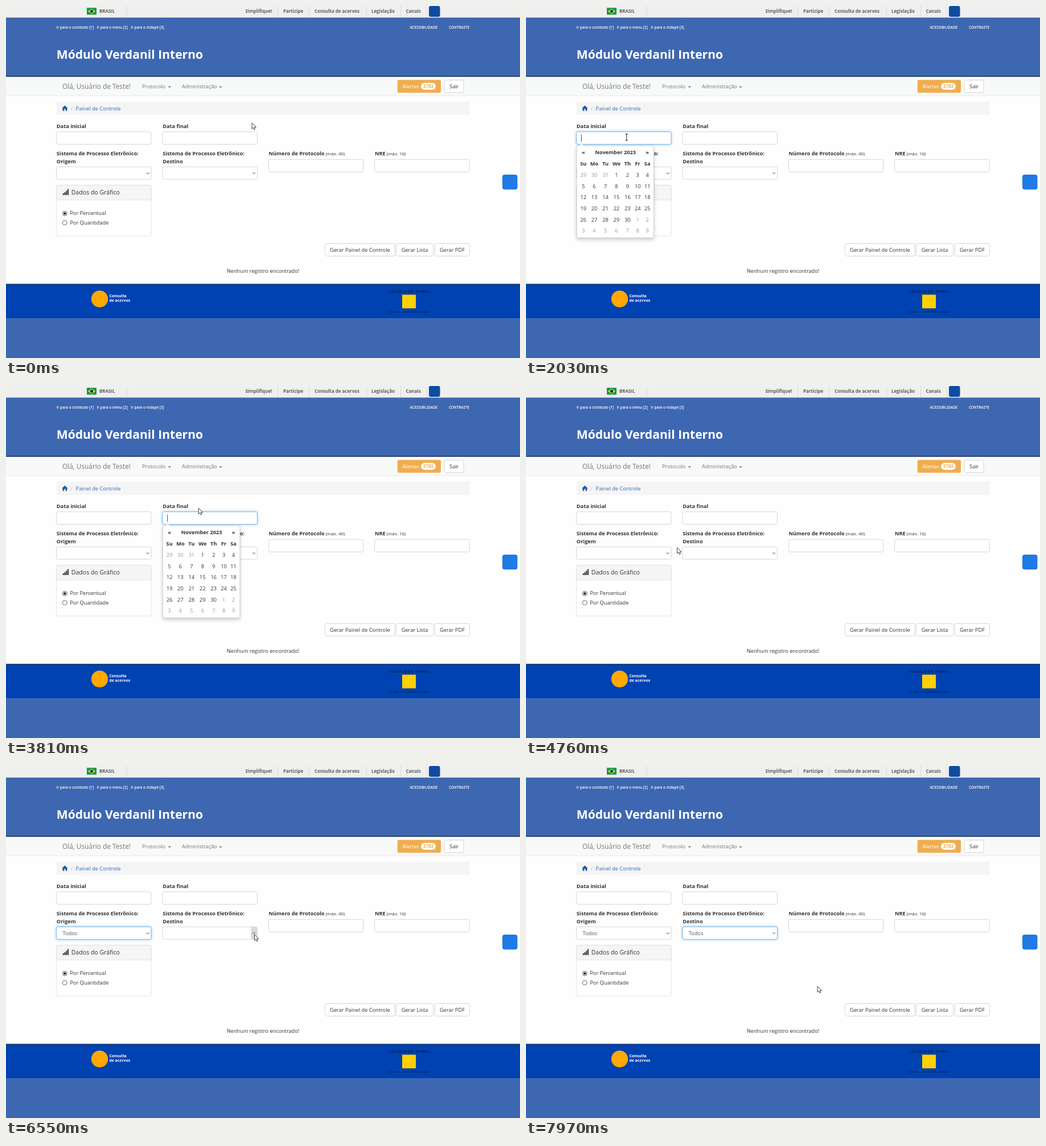
An HTML page that plays this animation: 903 px wide and 620 px high, repeating every 8000 ms.

```html
<!DOCTYPE html>
<html lang="pt-BR">
<head>
<meta charset="utf-8">
<title>Painel de Controle</title>
<style>
  html, body { margin: 0; width: 100%; height: 100%; overflow: hidden; background: #3e67b1; }
  svg { display: block; width: 903px; height: 620px; font-family: "Open Sans", sans-serif; }
  text { white-space: pre; }
  .focus { filter: drop-shadow(0 0 2.5px rgba(102, 175, 233, .7)); }
  .calendar { filter: drop-shadow(0 3px 3px rgba(0, 0, 0, .2)); }
  .list { filter: drop-shadow(0 0 1px rgba(0, 0, 0, .35)) drop-shadow(0 9px 11px rgba(0, 0, 0, .3)); }
</style>
</head>
<body>
<svg id="stage" viewBox="0 0 903 620"></svg>
<script>
const LOOP = 8000;
const INK = '#333', MUTED = '#777', BORDER = '#ccc', BLUE = '#3e67b1';
const COLUMN = 186.4, FIELD_W = 166.5, LEFT = 88.5;

const text = (x, y, label, { size = 9.22, fill = INK, weight = 400, anchor = 'start', spacing = 0 } = {}) =>
  `<text x="${x}" y="${y}" font-size="${size}" fill="${fill}" font-weight="${weight}"
    text-anchor="${anchor}" letter-spacing="${spacing}">${label}</text>`;
const centered = (x, y, label, style) => text(x, y, label, { anchor: 'middle', ...style });
const box = (x, y, w, h, fill, stroke = 'none', r = 0, extra = '') =>
  `<rect x="${x}" y="${y}" width="${w}" height="${h}" rx="${r}" fill="${fill}" stroke="${stroke}" stroke-width=".8" ${extra}/>`;
const path = (d, fill = 'none', stroke = 'none', width = 1) =>
  `<path d="${d}" fill="${fill}" stroke="${stroke}" stroke-width="${width}"/>`;
const circle = (x, y, r, fill, stroke = 'none') =>
  `<circle cx="${x}" cy="${y}" r="${r}" fill="${fill}" stroke="${stroke}" stroke-width=".9"/>`;
const show = (from, to, markup) => `<g data-from="${from}" data-to="${to}">${markup}</g>`;
const shift = (column, markup) => `<g transform="translate(${column * COLUMN})">${markup}</g>`;

const field = (column, y) => box(LEFT + column * COLUMN, y, FIELD_W, 22, '#fff', BORDER, 2.6);
const focus = y => box(LEFT, y, FIELD_W, 22, '#fff', '#66afe9', 2.6, 'class="focus"');
const button = (x, w, y, label) =>
  box(x, y, w, 22, '#fff', BORDER, 2.6) + centered(x + w / 2, y + 14.3, label);
const caretDown = x => path(`M${x} 141.6h5.4l-2.7 2.7z`, MUTED);

function topBar() {
  const links = [[420.5, 'Simplifique!'], [487, 'Participe'], [542, 'Consulta de acervos'],
    [642, 'Legislação'], [702.5, 'Canais']];
  const style = { size: 7.9, weight: 700, fill: '#606060' };
  return box(0, 0, 903, 21, '#efefef')
    + box(142, 3.2, 17, 12, '#0a9b3c')
    + path('M143.8 9.2l6.7-4.5 6.7 4.5-6.7 4.5z', '#fedf00') + circle(150.5, 9.2, 2.7, '#14317a')
    + text(164, 12, 'BRASIL', style)
    + [212, 477.5, 532.5, 633.5, 693.5, 739.5].map(x => box(x - .5, 0, 1, 20, '#dadada')).join('')
    + links.map(([x, label]) => text(x, 12, label, style)).join('')
    + box(743, 0, 19.5, 19, '#0f4ca3', 'none', 3);
}

function header() {
  const small = { size: 6.3, weight: 600, fill: '#fff' };
  return box(0, 20.4, 903, 104, BLUE) + box(0, 123, 903, 1.8, '#17305f')
    + text(88.8, 40, 'Ir para o conteúdo [1]', small)
    + text(159.5, 40, 'Ir para o menu [2]', small)
    + text(219.3, 40, 'Ir para o rodapé [3]', small)
    + text(709.5, 40, 'ACESSIBILIDADE', small) + text(778, 40, 'CONTRASTE', small)
    + text(88.8, 93, 'Módulo Verdanil Interno', { size: 21.1, weight: 700, fill: '#fff' })
    + box(0, 124.8, 903, 33.2, '#f8f9f9') + box(0, 157.6, 903, .8, '#e4e4e4')
    + text(99, 146, 'Olá, Usuário de Teste!', { size: 11.85, fill: MUTED })
    + text(239, 145, 'Protocolo', { fill: MUTED }) + caretDown(284.5)
    + text(309, 145, 'Administração', { fill: MUTED }) + caretDown(374.3)
    + box(687.8, 130.2, 76.2, 22.6, '#f0ad4e', 'none', 2.6)
    + text(696, 145, 'Alertas', { fill: '#fff' })
    + box(729, 135.5, 26, 12, '#fff', 'none', 6)
    + centered(742, 144.3, '2782', { size: 7.9, weight: 700, fill: '#f0ad4e' })
    + button(770.5, 33.5, 130.5, 'Sair')
    + box(89, 168.3, 725.3, 23.5, '#f5f5f5', 'none', 2.6)
    + path('M98 180.6l5.4-5.4 5.4 5.4h-1.5v4.2h-2.7v-3.2h-2.4v3.2h-2.7v-4.2z', '#2459a9')
    + text(113.6, 183.6, '/', { fill: '#bbb' })
    + text(122.6, 183.6, 'Painel de Controle', { fill: '#2d69b5' });
}

function form() {
  const bold = { weight: 700 }, note = { size: 7.85 };
  const system = (column, role) => shift(column,
    text(88.8, 263.4, 'Sistema de Processo Eletrônico:', { weight: 700, size: 9.18 }) + text(88.8, 276.5, role, bold));
  const bars = [3, 5, 7.5, 10.5].map((h, i) => box(99.8 + i * 2.7, 333 - h, 2, h, INK)).join('');
  return text(88.8, 215, 'Data inicial', bold) + text(275.2, 215, 'Data final', bold)
    + field(0, 221.6) + field(1, 221.6)
    + system(0, 'Origem') + system(1, 'Destino')
    + field(0, 283.3) + field(1, 283.3)
    + text(461.5, 263.4, 'Número de Protocolo', bold) + text(561.8, 263.4, '(máx. 40)', note)
    + text(648, 263.4, 'NRE', bold) + text(668.7, 263.4, '(máx. 16)', note)
    + field(2, 270.3) + field(3, 270.3)
    + box(LEFT, 315.5, FIELD_W, 89.5, '#fff', '#ddd', 2.6)
    + box(LEFT, 315.5, FIELD_W, 26.2, '#f5f5f5', '#ddd', 2.6)
    + bars + text(114.8, 332, 'Dados do Gráfico', { size: 10.55 })
    + circle(103.3, 365.4, 4, '#fff', '#444') + circle(103.3, 365.4, 2.2, '#222')
    + circle(103.3, 381.7, 4, '#fff', '#555')
    + text(112.3, 368.3, 'Por Percentual') + text(112.3, 384.7, 'Por Quantidade')
    + button(560.7, 122.5, 418.4, 'Gerar Painel de Controle')
    + button(685.3, 65.5, 418.4, 'Gerar Lista')
    + button(753.5, 61, 418.4, 'Gerar PDF')
    + text(387.8, 469.8, 'Nenhum registro encontrado!');
}

function footer() {
  const white = { size: 6.9, weight: 700, fill: '#fff' };
  return box(0, 489.7, 903, 61, '#0042b1') + box(0, 489.6, 903, 1.2, '#0a2454')
    + box(0, 550.4, 903, 70, BLUE)
    + circle(164.5, 516, 14.7, '#ffa800')
    + text(181.4, 512.5, 'Consulta', white) + text(181.4, 521, 'de acervos', white)
    + centered(708, 505.3, 'COLEGIADO NOVIL', { size: 6, weight: 700, fill: '#0b1838', spacing: 1 })
    + box(696, 508.5, 24, 24, '#ffd000')
    + centered(708, 540.5, 'RITMO E CONTINUIDADE', { size: 5, fill: '#0b1838', spacing: .7 })
    + box(872, 297, 26.5, 26.2, '#1f7ae6', 'none', 4);
}

function calendar() {
  const centers = [100.8, 120, 139.6, 159, 178.4, 196.2, 213.2];
  const bold = { weight: 700 };
  let cells = '';
  for (let i = 0; i < 42; i++) {
    const day = i - 2;
    const inMonth = day >= 1 && day <= 30;
    const label = day < 1 ? day + 31 : inMonth ? day : day - 30;
    cells += centered(centers[i % 7], 300.8 + Math.floor(i / 7) * 19.7, label, { fill: inMonth ? INK : '#999' });
  }
  return `<g class="calendar">${box(89, 246, 135.5, 162.3, '#fff', '#c8c8c8', 2.6)}</g>`
    + path('M93 246.5l4.5-4.6 4.5 4.6', '#fff', '#c8c8c8', .8)
    + centered(100.8, 261.4, '«', bold) + centered(157.2, 261.4, 'November 2023', bold) + centered(213.2, 261.4, '»', bold)
    + ['Su', 'Mo', 'Tu', 'We', 'Th', 'Fr', 'Sa'].map((d, i) => centered(centers[i], 281, d, bold)).join('')
    + cells;
}

const OPTIONS = ['', 'Todos', 'VOLQ-TUL', 'VUZ-TUL', 'VYX-PRELO', 'WUVQ-TUL', 'VQ-TUL', 'VURZ-TUL',
  'VOZUQE-PRELUNA', 'WEZORA-TUL', 'WQV-TUL', 'WYR-TUL', 'WZU-TUL', 'XOVUR-TUL', 'XUREVO-TUL',
  'XUREVO-TUL', 'Apagar', 'ZOVUK', 'ZOVUK2', 'ZQ-VUL'];

// picks: [from, to, highlighted row]
function list(picks) {
  const rowY = i => 304.7 + i * 13.12;
  const highlight = ([from, to, row]) => show(from, to,
    box(89, Math.max(rowY(row), 306), 221.3, row ? 13.12 : 12, '#1967d2')
    + text(99.5, rowY(row) + 9.8, OPTIONS[row], { fill: '#fff' }));
  return `<g class="list">${box(89, 305.8, 231.3, 262.6, '#fff', 'none', 3.5)}</g>`
    + box(310.3, 306.5, 9.5, 261, '#f7f7f7', 'none', 3)
    + box(310.3, 317, 9.7, 19.5, '#c1c1c1')
    + path('M313 312.2l2.2-2.2 2.2 2.2', 'none', '#999')
    + path('M313 562.3l2.2 2.2 2.2-2.2', 'none', '#444', 1.2)
    + OPTIONS.map((label, i) => text(99.5, rowY(i) + 9.8, label, { fill: '#555' })).join('')
    + picks.map(highlight).join('');
}

const textCaret = box(96.9, 226.5, .9, 12.5, '#333');
const arrowHover = box(243.8, 283.8, 10.8, 21, '#d9d9d9');
const chevron = path('M246.4 293.2l2.7 2.6 2.7-2.6', 'none', '#444', 1);
const chosen = text(99.5, 297.8, 'Todos', { fill: '#555' });

const fields =
  show(1830, 3450, focus(221.6)) + show(1830, 2430, textCaret)
  + show(5040, 6820, focus(283.3)) + show(4940, 5920, arrowHover) + show(5920, LOOP, chosen) + chevron
  + shift(1, show(6820, LOOP, focus(283.3)) + show(6480, 7690, arrowHover) + show(7690, LOOP, chosen) + chevron);

const popups =
  show(1900, 3450, calendar())
  + shift(1, show(3520, 4200, focus(221.6) + calendar()) + show(3520, 3900, textCaret))
  + show(5110, 5920, list([[0, 5460, 0], [5460, LOOP, 1]]))
  + shift(1, show(6820, 7690, list([[0, 6960, 0], [6960, 7160, 1], [7160, 7360, 2], [7360, LOOP, 1]])));

const stage = document.getElementById('stage');
stage.innerHTML = box(0, 0, 903, 620, '#fefefe')
  + topBar() + header() + form() + footer() + fields + popups
  + `<g id="pointer">
      <g id="arrow">${path('M0 0V10.4L2.4 8.2 4 11.8 5.8 11 4.2 7.5H7.4Z', '#fff', '#222', .85)}</g>
      <g id="beam">${path('M-2.4 -5.5H2.4M0 -5.5V5.5M-2.4 5.5H2.4', 'none', '#222', 1)}</g>
    </g>`;

// [start, end, steps, waypoints]
const MOVES = [
  [850, 1620, 12, [[432, 206], [181, 221]]],
  [1690, 2030, 5, [[181, 221], [176.7, 231]]],
  [2430, 2710, 5, [[176.7, 231], [201, 210]]],
  [2920, 3670, 11, [[201, 210], [270, 203], [338, 231]]],
  [3740, 4490, 11, [[338, 231], [338.5, 203], [342, 203], [316, 258]]],
  [4560, 5320, 12, [[316, 258], [248, 294], [248, 294]]],
  [5390, 5590, 4, [[248, 294], [140, 320]]],
  [5920, 6550, 9, [[140, 320], [436.5, 297]]],
  [6750, 7160, 7, [[436.5, 297], [436.5, 297], [330, 328], [330, 331.5]]],
  [7360, 7430, 2, [[330, 331.5], [330, 325]]],
  [7690, 7970, 5, [[330, 325], [512, 388]]]
];

const ease = p => p * p * (3 - 2 * p);

function pointerAt(time) {
  const move = MOVES.findLast(([start]) => time >= start);
  if (!move) return MOVES[0][3][0];
  const [start, end, steps, points] = move;
  const step = Math.floor((time - start) / (end - start) * (steps - 1) + .1) + 1;
  const along = Math.min(1, step / steps) * (points.length - 1);
  const i = Math.min(Math.floor(along), points.length - 2);
  const p = ease(along - i);
  return points[i].map((v, axis) => v + (points[i + 1][axis] - v) * p);
}

const timed = [...stage.querySelectorAll('[data-from]')];
const [pointer, arrow, beam] = ['pointer', 'arrow', 'beam'].map(id => document.getElementById(id));
const toggle = (node, visible) => node.setAttribute('display', visible ? 'inline' : 'none');

function render(now) {
  const time = now % LOOP;
  for (const node of timed) toggle(node, time >= +node.dataset.from && time < +node.dataset.to);
  const [x, y] = pointerAt(time);
  const overInput = y > 222 && y < 243 && ((x > 89 && x < 255) || (x > 275 && x < 441));
  pointer.setAttribute('transform', `translate(${x} ${y})`);
  toggle(arrow, !overInput);
  toggle(beam, overInput);
}

const origin = performance.now();
function frame() {
  render(performance.now() - origin);
  requestAnimationFrame(frame);
}
frame();
</script>
</body>
</html>
```
